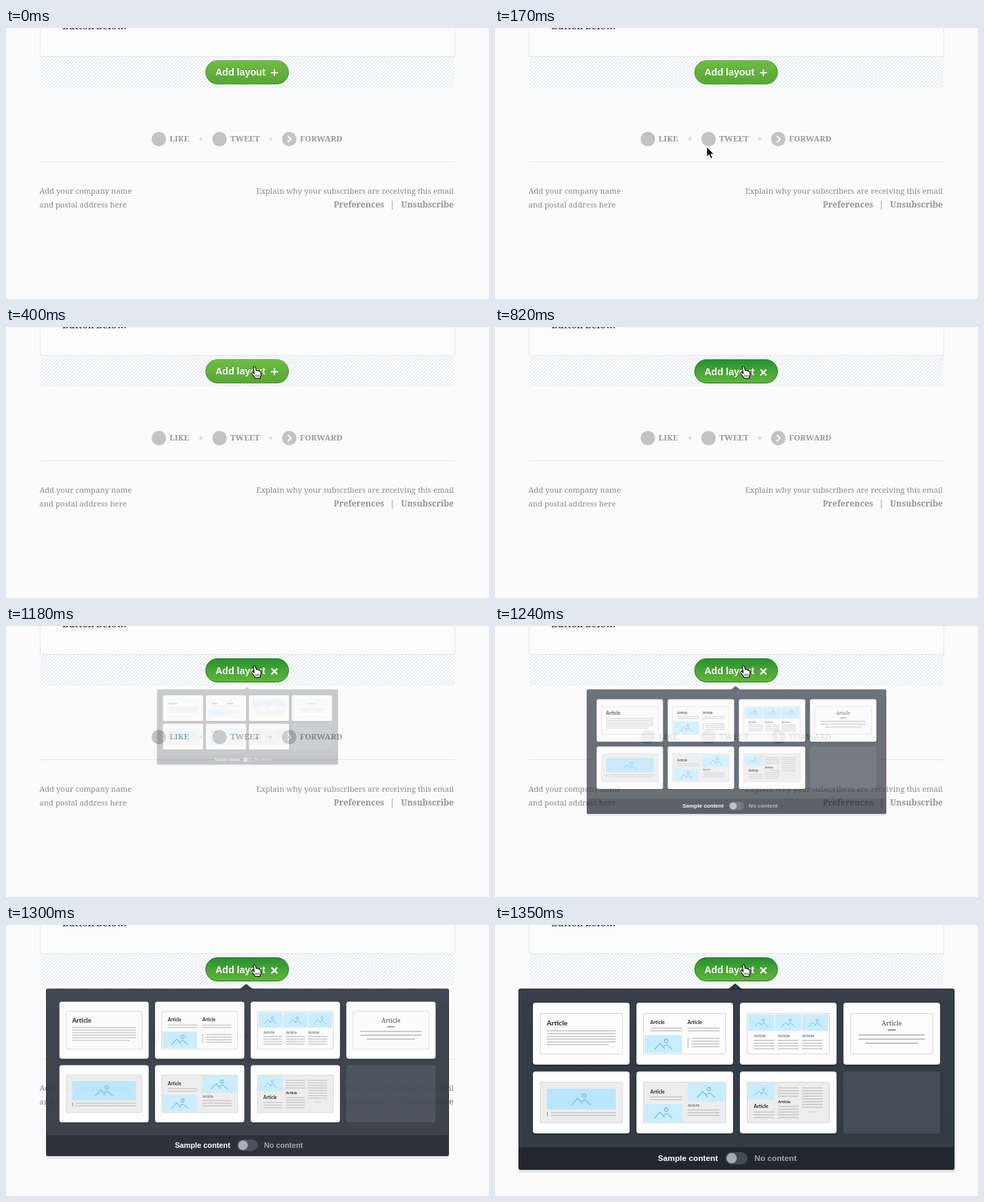
Write an HTML page that moves like this. It is 700 px wide and 394 px high and loops after 4230 ms.

```html
<!DOCTYPE html>
<html lang="en">
<head>
<meta charset="utf-8">
<title>Add layout</title>
<style>
  html, body { margin: 0; width: 100%; height: 100%; overflow: hidden; background: #fbfbfb; }
  svg { display: block; width: 100%; height: 100%; }
  .serif { font-family: "Noto Serif", Georgia, serif; }
  .sans { font-family: "Liberation Sans", Arial, sans-serif; font-weight: 700; }
  .round { font-family: Lato, sans-serif; font-weight: 800; }
  .bold { font-weight: 700; }
</style>
</head>
<body>
<svg viewBox="0 0 700 394" xmlns="http://www.w3.org/2000/svg">
  <defs>
    <pattern id="hatch" x="50" y="42" width="5" height="5" patternUnits="userSpaceOnUse">
      <path d="M-1 1L1 -1M-1 6L6 -1M4 6L6 4" stroke="#cfdbe2" stroke-width=".9"/>
    </pattern>
    <linearGradient id="idleFill" x2="0" y2="1">
      <stop stop-color="#6dbd44"/><stop offset="1" stop-color="#58a634"/>
    </linearGradient>
    <linearGradient id="activeFill" x2="0" y2="1">
      <stop stop-color="#279030"/><stop offset=".5" stop-color="#48a436"/><stop offset="1" stop-color="#61b53a"/>
    </linearGradient>
    <linearGradient id="panelFill" x2="0" y2="1">
      <stop stop-color="#38414a"/><stop offset=".15" stop-color="#343c45"/><stop offset="1" stop-color="#333b43"/>
    </linearGradient>
  </defs>

  <rect width="700" height="394" fill="#fbfbfb"/>
  <rect x="50" y="42" width="600" height="45" fill="url(#hatch)"/>
  <path d="M49.5 0V41.5H650.5V0" fill="#fcfcfc" stroke="#e4e5e6"/>
  <text class="serif bold" x="82" y="1.5" font-size="13.4" fill="#444">button below.</text>

  <g id="share" class="serif bold" font-size="11.6" fill="#999"></g>
  <path d="M49 194.5H651" stroke="#e6e6e6"/>
  <g class="serif" font-size="11.15" fill="#8c8c8c">
    <text x="48.5" y="241">Add your company name</text>
    <text x="48.5" y="261">and postal address here</text>
    <text x="649" y="241" text-anchor="end">Explain why your subscribers are receiving this email</text>
    <g class="bold" font-size="12.1" fill="#959595">
      <text x="475" y="261">Preferences</text>
      <text x="560" y="261" text-anchor="middle">|</text>
      <text x="649" y="261" text-anchor="end">Unsubscribe</text>
    </g>
  </g>

  <g id="panel"></g>

  <g id="button">
    <rect id="pill" x="289.5" y="47.5" width="120" height="34" rx="17"/>
    <path id="rim" d="M300 49.2Q303 48.5 307 48.5H392Q397 48.5 400 49.2" fill="none" stroke="#8bcb68" stroke-opacity=".6"/>
    <g id="label" class="sans" font-size="14">
      <text x="303.5" y="68" fill="#2f7320" fill-opacity=".45">Add layout</text>
      <text x="303.5" y="69" fill="#fff">Add layout</text>
      <path id="sign" d="M384 65H394M389 60V70" stroke="#fff" stroke-width="2"/>
    </g>
  </g>

  <g id="cursor">
    <path id="arrow" d="M0 0V14.5L3.4 11.4L5.8 17L8.3 16L5.9 10.5H10.4Z"
      fill="#000" stroke="#fff" stroke-width="1"/>
    <path id="hand" d="M-1.5 1.3C-1.5 -.6 1.2 -.8 1.7 1.1L2.6 5.4C3.4 4.4 4.9 4.7 5.2 5.9
      C6 5.2 7.3 5.6 7.5 6.8C8.6 6.2 9.5 7 9.5 8.2V11.5C9.5 13.3 8.3 14.4 8.2 16.8H1
      C.6 14.7-2.2 12.5-3.8 10C-4.6 8.5-2.8 7.3-1.5 8.6L-.3 9.8Z"
      fill="#fff" stroke="#000" stroke-width="1.1" stroke-linejoin="round"/>
    <path id="fingers" d="M2.2 11.5V14.5M4.4 11.5V14.5M6.6 11.5V14.5" stroke="#000" stroke-width=".8"/>
  </g>
</svg>

<script>
const LOOP = 4230, PRESS = 820;
const $ = id => document.getElementById(id);

const rect = (x, y, w, h, fill, extra = "") =>
  `<rect x="${x}" y="${y}" width="${w}" height="${h}" fill="${fill}" ${extra}/>`;
const text = (x, y, size, cls, words, extra = "") =>
  `<text x="${x}" y="${y}" font-size="${size}" class="${cls}" ${extra}>${words}</text>`;

// Rows of placeholder copy; the last row may be shorter.
function rows(x, y, w, count, last = w, gap = 4, fill = "#cbcbcb") {
  let out = "";
  for (let i = 0; i < count; i++)
    out += rect(x, y - 1 + i * gap, i === count - 1 ? last : w, 1.7, fill);
  return out;
}

function picture(x, y, w, h, scale = 1, fill = "#c9edfe") {
  return rect(x, y, w, h, fill) +
    `<g transform="translate(${x + w / 2} ${y + h / 2}) scale(${scale})" fill="none" stroke="#73bfe2" stroke-width="1.3">
      <path d="M-13 8L-5 -1L2 7M-1 4L5 1L13 8"/><circle cx="4" cy="-4.5" r="2.5"/></g>`;
}

const heading = (x, y, size) => text(x, y, size, "round", "Article", 'fill="#333"');
const serifHeading = (x, y, size, extra = "") =>
  text(x, y, size, "serif", "Article", `fill="#444" ${extra}`);

// Drawings are relative to the top left corner of a 140 by 90 card.
const cards = [
  heading(20, 33, 10) + rows(20, 41, 100, 6, 90),

  heading(20, 31, 7) + heading(74, 31, 7) +
    rows(20, 37, 46, 2) + rows(74, 37, 46, 2) +
    picture(12, 47, 54, 26) +
    rect(74, 51, 1.5, 14, "#c4c4c4") + rows(80, 52, 40, 4),

  [0, 1, 2].map(i =>
    picture(12 + i * 39, 17, 38, 24, .75) +
    serifHeading(20 + i * 35, 50, 5.5) +
    rows(20 + i * 35, 55, 30, 4)).join(""),

  serifHeading(70, 33, 9.2, 'text-anchor="middle"') + rect(64, 39, 12, 1.2, "#555") +
    rows(22, 47, 96, 2, 96, 6, "#b8b8b8") + rows(32, 59, 76, 1, 76, 6, "#b8b8b8"),

  picture(20, 25, 100, 30, 1.05, "#b9e6fd") +
    rect(20, 59, 1.5, 6, "#aaa") + rows(26, 60, 94, 2),

  heading(20, 32, 7) + rows(20, 37, 46, 2) +
    picture(74, 17, 54, 26) + picture(12, 47, 54, 26) +
    serifHeading(74, 51, 5.5) + rows(74, 56, 46, 3),

  picture(12, 17, 38, 24, .75) +
    heading(20, 53, 7) + rows(20, 59, 30, 3) +
    rows(55, 24, 30, 4) + heading(55, 46, 6) + rows(55, 51, 30, 5) +
    rows(90, 24, 30, 8) + rect(99, 58, 12, 1, "#ccc")
];

function card(drawing, i) {
  const x = 55 + i % 4 * 150, y = i < 4 ? 113 : 213;
  return `<g transform="translate(${x} ${y})">` +
    rect(0, 2, 140, 90, "#20262c", 'rx="4" opacity=".6"') +
    rect(0, 0, 140, 90, "#fff", 'rx="4"') +
    rect(10.5, 15.5, 119, 59, i < 4 ? "#fcfcfc" : "#ededed", 'stroke="#d6d6d6"') +
    drawing + "</g>";
}

$("panel").innerHTML =
  rect(34, 97, 632, 263, "#e3e4e4", 'rx="3"') +
  '<path d="M338 93L348 85L358 93Z" fill="#2f373f"/>' +
  rect(34, 92.5, 632, 263.5, "#22272f", 'rx="3"') +
  rect(35, 94, 630, 229, "url(#panelFill)", 'rx="2"') +
  cards.map(card).join("") +
  rect(505, 213, 140, 90, "#444c55", 'rx="4"') +
  text(236, 343, 11.7, "sans", "Sample content", 'fill="#fff"') +
  rect(334, 330, 32, 18, "#434b55", 'rx="9"') +
  '<circle cx="343" cy="339" r="7.5" fill="#a4abb3"/>' +
  text(376, 343, 11.7, "sans", "No content", 'fill="#9fa5ac"');

const dot = x => `<circle cx="${x}" cy="161.5" r="10.5" fill="#c3c3c3"/>`;
const diamond = x => `<path d="M${x - 3} 161.5l3-3l3 3l-3 3z" fill="#dedede"/>`;
$("share").innerHTML =
  dot(221.5) + dot(309.5) + dot(410.5) + diamond(282.5) + diamond(383.5) +
  '<path d="M408.5 157L413 161.5L408.5 166" fill="none" stroke="#fff" stroke-width="2"/>' +
  '<text x="237" y="165">LIKE</text><text x="325" y="165">TWEET</text><text x="426" y="165">FORWARD</text>';

// Pop-up poses: start time, scale, opacity.
const poses = [[1180, .415, .25], [1240, .687, .72], [1300, .924, .95], [1350, 1, 1]];

const show = (id, on) => $(id).setAttribute("visibility", on ? "visible" : "hidden");
const bezier = (a, b, c, u) => (1 - u) ** 2 * a + 2 * u * (1 - u) * b + u * u * c;

function moveCursor(t) {
  const step = t < 60 ? 0 : Math.min(7, 1 + Math.floor((t - 60) / 340 * 6 + .01));
  const u = 1 - (1 - step / 7) ** 3;
  const x = bezier(633.5, 167, 360, u), y = bezier(392.5, 210, 58, u);
  const over = x > 289 && x < 410 && y > 47 && y < 82;
  $("cursor").setAttribute("transform", `translate(${x} ${y})`);
  show("arrow", !over);
  show("hand", over);
  show("fingers", over);
}

function pressButton(on) {
  $("pill").setAttribute("fill", `url(#${on ? "activeFill" : "idleFill"})`);
  $("pill").setAttribute("stroke", on ? "#1f7d22" : "#4c9a2e");
  show("rim", !on);
  $("label").setAttribute("transform", on ? "translate(0 1)" : "");
  $("sign").setAttribute("transform", on ? "translate(389 65) rotate(45) scale(1.2) translate(-389 -65)" : "");
}

function openPanel(t) {
  const pose = poses.filter(([start]) => t >= start).pop();
  show("panel", pose);
  if (!pose) return;
  const [, scale, opacity] = pose;
  $("panel").setAttribute("transform", `translate(350 92) scale(${scale}) translate(-350 -92)`);
  $("panel").setAttribute("opacity", opacity);
}

function draw() {
  const t = performance.now() % LOOP;
  moveCursor(t);
  pressButton(t >= PRESS);
  openPanel(t);
  requestAnimationFrame(draw);
}
draw();
</script>
</body>
</html>
```
